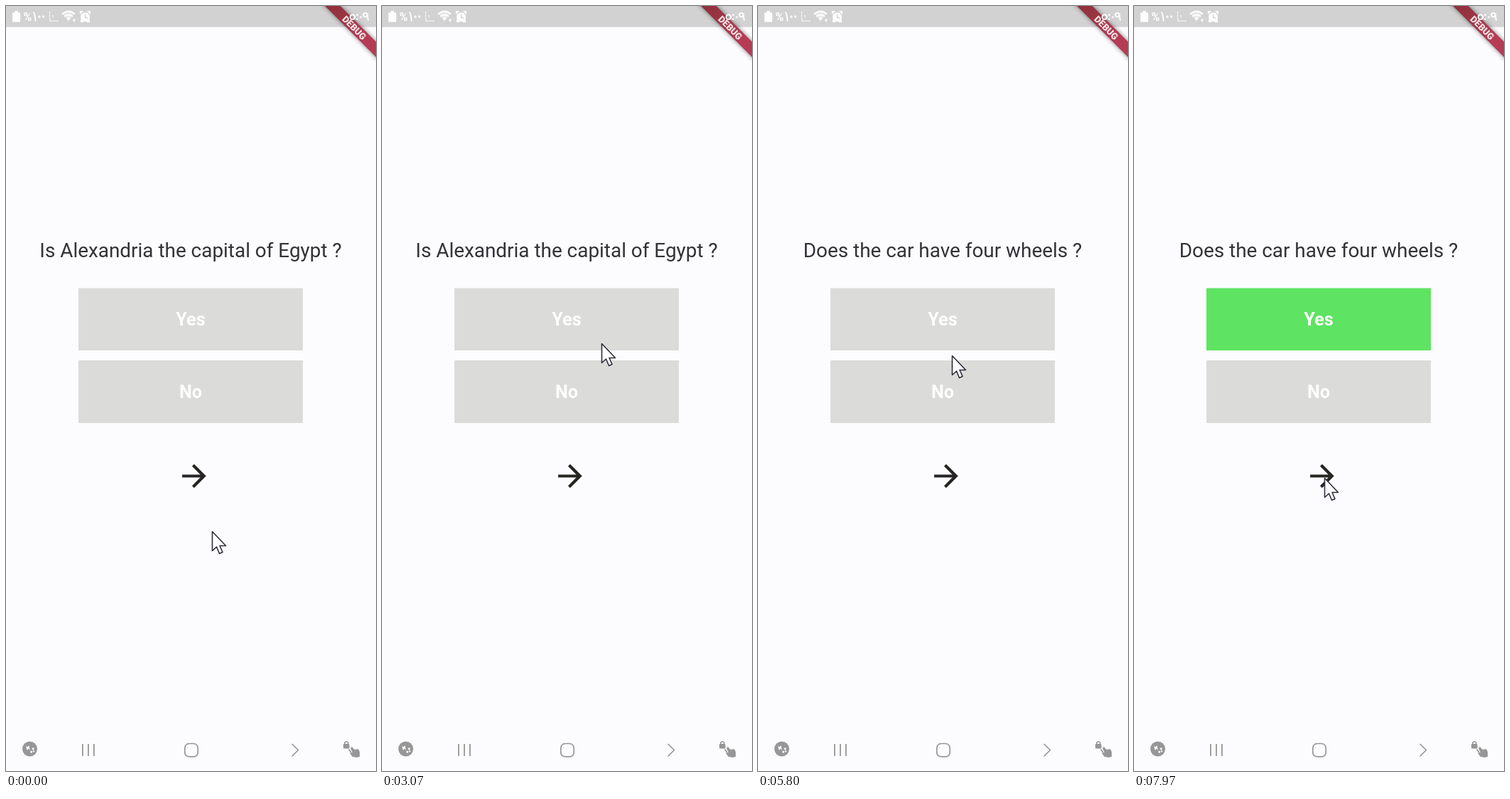
Animation of 521 by 1075 pixels, one loop 8 s. Source, as an HTML page:

```html
<!DOCTYPE html>
<html lang="en">
<head>
<meta charset="utf-8">
<title>Quiz</title>
<style>
  html, body { margin: 0; width: 100%; height: 100%; overflow: hidden; background: #fcfcfe; }
  svg { display: block; width: 100%; height: 100%; }
  text { font-family: Roboto, "Open Sans", sans-serif; text-anchor: middle; }
  .label { font-size: 25.3px; font-weight: 700; fill: #fff; }
  .line { fill: none; stroke-linecap: round; stroke-linejoin: round; }
</style>
</head>
<body>
<svg viewBox="0 0 521 1075">
  <defs>
    <filter id="blur" x="-20%" y="-80%" width="140%" height="260%"><feGaussianBlur stdDeviation="2.6"/></filter>
  </defs>
  <rect width="521" height="1075" fill="#fcfcfe"/>

  <!-- status bar -->
  <rect width="521" height="29.5" fill="#d2d2d2"/>
  <g fill="#fff">
    <path d="M9 9.5h3v-2.500h5v2.500h3v13h-11z"/>
    <text x="30.500" y="20.500" font-size="16" font-weight="700">%</text>
    <circle cx="47" cy="15" r="1.700"/><circle cx="52.500" cy="15" r="1.700"/>
    <path d="M80 11q8-8 16 0l-8 10z" opacity=".45"/>
    <path d="M85 17q3-3 6 0l-3 4z"/>
    <circle cx="96" cy="20" r="1.700"/>
    <circle cx="111.500" cy="15.500" r="6.500"/>
    <path d="M104 7h5l-5 5zM119 7h-5l5 5zM105 19h4v4h-4zM114 19h4v4h-4z"/>
  </g>
  <g class="line" stroke="#fff" stroke-width="1.800">
    <path d="M39 9q2 3 2.500 12"/>
    <path d="M79.500 11q8.500-7 17 0M82.500 14.500q5.500-4 11 0"/>
    <path d="M61.500 8v13h12M66 13v4" stroke-width="1.300" stroke-dasharray="2.500 2" opacity=".8"/>
    <path d="M111.500 12v4l3 1" stroke="#d2d2d2" stroke-width="1.400"/>
  </g>

  <!-- corner banner -->
  <g transform="translate(521) rotate(45) scale(1.2676)">
    <rect x="-46" y="28" width="92" height="12" fill="#000" opacity=".5" filter="url(#blur)"/>
    <linearGradient id="red"><stop offset=".1" stop-color="#8d3039"/><stop offset=".65" stop-color="#b53c54"/></linearGradient>
    <rect x="-46" y="28" width="92" height="12" fill="url(#red)"/>
    <text y="37.700" font-size="10.200" font-weight="900" fill="#f6e9eb">DEBUG</text>
  </g>
  <g class="line" stroke="#fff" stroke-width="2">
    <circle cx="488" cy="15.500" r="3.300"/>
    <path d="M494.500 12.500v.1M494.500 18.500v.1M499.500 15.500v.1" stroke-width="2.600"/>
    <circle cx="506" cy="12.500" r="2.700"/><path d="M509 11q0 6 1 9"/>
  </g>

  <!-- quiz -->
  <text id="question" x="260" y="353" font-size="27.900" fill="#333236"></text>
  <rect id="yes" x="102" y="396.500" width="316" height="87.500"/>
  <text class="label" x="260" y="448.500">Yes</text>
  <rect id="no" x="102" y="498" width="316" height="88"/>
  <text class="label" x="260" y="550.500">No</text>
  <path transform="translate(239.700 635.300) scale(2.100)" fill="#272523"
    d="M12 4l-1.410 1.410L16.170 11H4v2h12.170l-5.580 5.590L12 20l8-8z"/>

  <!-- navigation bar -->
  <g fill="#969696">
    <circle cx="33.500" cy="1044" r="10.500"/>
    <g transform="translate(33.500 1044) rotate(30)" fill="#fcfcfe">
      <path d="M-6-1h2v-2h2v2h2v2h-2v2h-2v-2h-2z"/>
      <circle cx="4" cy="-2.500" r="1.500"/><circle cx="4" cy="2.500" r="1.500"/><circle cx="6.500" r="1.200"/>
    </g>
    <path d="M107 1037h1.800v17h-1.800zM115 1037h1.800v17h-1.800zM123 1037h1.800v17h-1.800z"/>
    <rect x="475" y="1037" width="8.500" height="6.500" rx="1"/>
    <path d="M487 1041l4 4 5-1 2 4v7l-4 1-6-1-4-5 4-1-3-6z"/>
  </g>
  <g class="line" stroke="#969696" stroke-width="1.700">
    <rect x="251.800" y="1036.500" width="18.400" height="18.400" rx="6"/>
    <path d="M403 1037.500l8.500 8-8.500 8.500M477 1037v-2q2.300-3 4.600 0v2M483 1045l3 4"/>
  </g>

  <path id="cursor" fill="#fff" stroke="#302f3c" stroke-width="1.600" stroke-linejoin="round"
    d="M.5 .5V27.500L6.500 22L10.500 31.500L15 29.500L11 20.500H19.500Z"/>
</svg>
<script>
const LOOP = 8000, GREY = '#dbdbd9', GREEN = '#5fe362';
const NO_TAP = 4060, NEXT_TAP = 5260, YES_TAP = 6440;
const $ = id => document.getElementById(id);

// time, x, y of the pointer tip
const path = [
  [30, 290, 738], [730, 312, 590], [930, 312, 590], [1230, 326, 500],
  [1870, 326, 500], [2270, 355, 401], [2600, 355, 401], [3070, 309, 474],
  [3800, 288, 542], [4200, 288, 542], [4940, 264, 651], [5300, 264, 655],
  [5800, 273, 491], [6250, 282, 449], [6800, 282, 449], [7700, 268, 663]
];

function pointer(t) {
  const i = path.findIndex(p => p[0] > t);
  if (i < 1) return path.at(i).slice(1);
  const [a, b] = [path[i - 1], path[i]];
  const u = (t - a[0]) / (b[0] - a[0]), k = u * u * (3 - 2 * u);
  return [1, 2].map(j => a[j] + (b[j] - a[j]) * k);
}

function draw(now) {
  const t = now % LOOP;
  const text = t < NEXT_TAP ? 'Is Alexandria the capital of Egypt ?' : 'Does the car have four wheels ?';
  if ($('question').textContent !== text) $('question').textContent = text;
  $('yes').setAttribute('fill', t >= YES_TAP ? GREEN : GREY);
  $('no').setAttribute('fill', t >= NO_TAP && t < NEXT_TAP ? GREEN : GREY);
  $('cursor').setAttribute('transform', `translate(${pointer(t)})`);
  requestAnimationFrame(draw);
}
draw(0);
</script>
</body>
</html>
```
